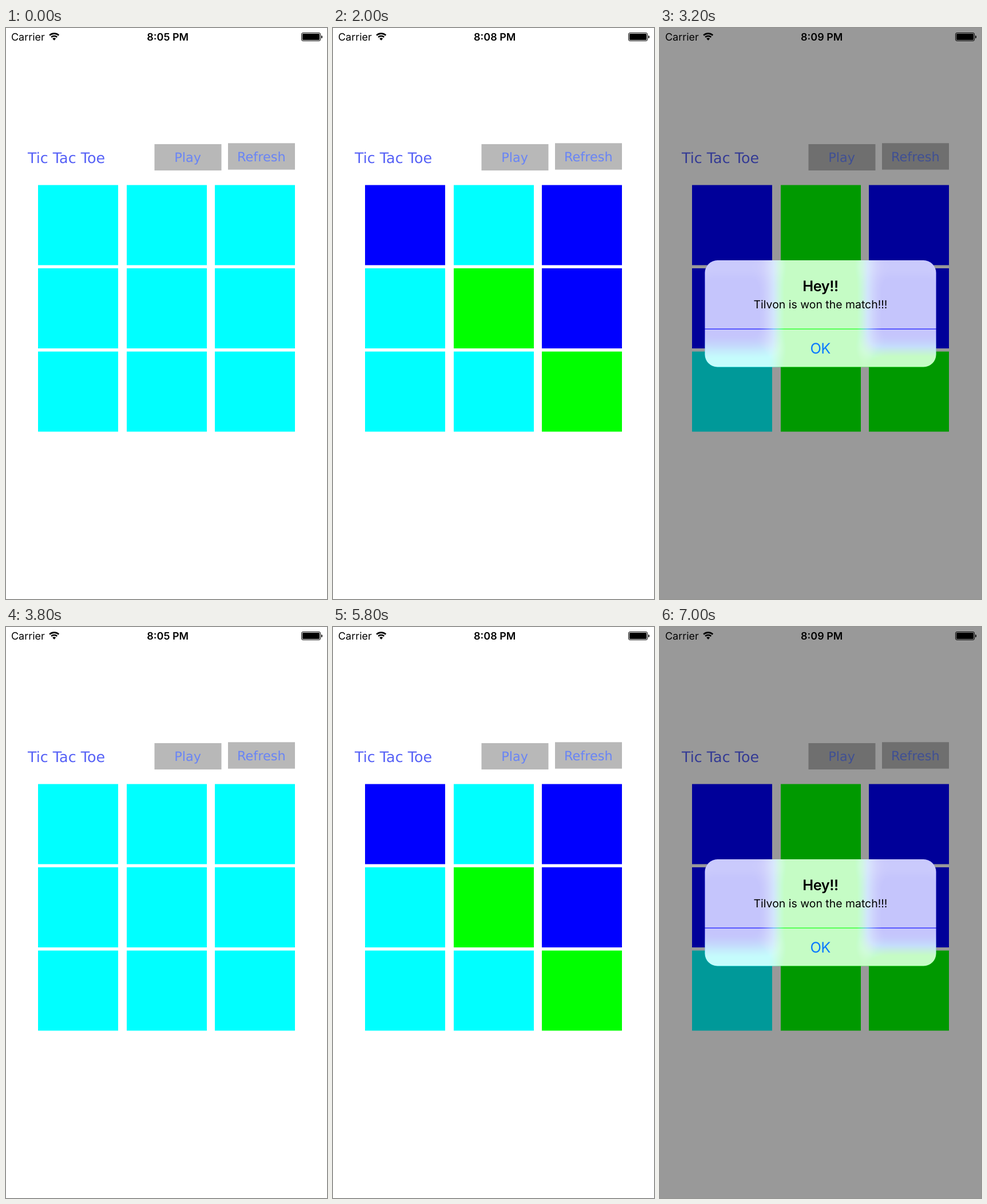
Write an HTML page that moves like this. It is 561 px wide and 998 px high and loops after 7600 ms.

```html
<!DOCTYPE html>
<html lang="en">
<head>
<meta charset="utf-8">
<title>Tic Tac Toe</title>
<style>
  html, body { margin: 0; width: 100%; height: 100%; overflow: hidden; background: #fff; }
  svg { display: block; width: 561px; height: 998px; }
  text { font-family: Inter, sans-serif; text-rendering: geometricPrecision; }
  .verdana { font-family: "DejaVu Sans", sans-serif; }
  .status { font-size: 17.95px; }
  .mid { text-anchor: middle; }
  .bold { font-weight: 600; }
  .button rect { fill: #b8b8b8; }
  .button text { fill: #6884f6; font-size: 22.4px; }
</style>
</head>
<body>
<svg viewBox="0 0 561 998">
  <defs>
    <filter id="frost" filterUnits="userSpaceOnUse" x="0" y="200" width="561" height="600" color-interpolation-filters="sRGB">
      <feGaussianBlur stdDeviation="15"/>
      <feColorMatrix type="saturate" values="1.8"/>
    </filter>
    <clipPath id="panel"><rect x="78.5" y="406" width="404" height="186.5" rx="22"/></clipPath>
  </defs>

  <rect width="561" height="998" fill="#fff"/>

  <text class="status" x="9" y="22">Carrier</text>
  <g fill="none" stroke="#000" stroke-width="2.6">
    <path d="M76.1 12.8A12 12 0 0 1 92.3 12.8M79.1 16A7.6 7.6 0 0 1 89.3 16"/>
    <path d="M84.2 21.8L81.2 18.6A4.3 4.3 0 0 1 87.2 18.6Z" fill="#000" stroke="none"/>
  </g>
  <text id="clock" class="status mid bold" x="282.7" y="22"></text>
  <rect x="516.5" y="8.5" width="33" height="14" rx="2.5" fill="none" stroke="#000"/>
  <rect x="518" y="10" width="30" height="11" rx="1.2"/>
  <path d="M551 13a2 2.6 0 0 1 0 5.2Z"/>

  <text class="verdana" x="38" y="236" font-size="25.4" fill="#5560f6">Tic Tac Toe</text>
  <g class="button">
    <rect x="259.5" y="203" width="117" height="46"/>
    <text class="verdana mid" x="317.7" y="234">Play</text>
    <rect x="388" y="201.3" width="117" height="46.3"/>
    <text class="verdana mid" x="446.3" y="232.5">Refresh</text>
  </g>

  <g id="board"></g>

  <g id="alert">
    <rect width="561" height="998" opacity=".4"/>
    <g clip-path="url(#panel)">
      <g filter="url(#frost)">
        <rect y="200" width="561" height="600" fill="#fff"/>
        <use href="#board"/>
      </g>
      <!-- the gap between the two halves is the divider -->
      <path d="M78 406h405v119.6H78ZM78 526.7h405v66H78Z" fill="rgb(251,251,251)" fill-opacity=".785"/>
      <rect x="78" y="525.6" width="405" height="1.1" fill="#fff" opacity=".15"/>
    </g>
    <text class="mid bold" x="280.5" y="460" font-size="25.4" letter-spacing="-.4">Hey!!</text>
    <text class="mid" x="280.5" y="490" font-size="19.45">Tilvon is won the match!!!</text>
    <text class="mid" x="280.2" y="568.5" font-size="25.4" letter-spacing="-.6" fill="#0a7aff">OK</text>
  </g>
</svg>
<script>
  const STEP = 400, LOOP = 3800;
  const moves = [2, 4, 5, 8, 0, 1, 3, 7];   // cells in order of play, players alternate
  const minutes = "555667889";
  const EMPTY = "#0ff", PLAYERS = ["#00f", "#0f0"];
  const $ = id => document.getElementById(id);

  const cells = Array.from({ length: 9 }, (_, i) => {
    const cell = document.createElementNS("http://www.w3.org/2000/svg", "rect");
    const box = { x: [56, 211, 365][i % 3], y: 274.5 + 145.5 * Math.floor(i / 3), width: 140, height: 140 };
    for (const key in box) cell.setAttribute(key, box[key]);
    return $("board").appendChild(cell);
  });

  let shown = -1;
  function draw(now) {
    const step = Math.min(moves.length, Math.floor(now % LOOP / STEP));
    if (step !== shown) {
      shown = step;
      cells.forEach((cell, i) => {
        const turn = moves.indexOf(i);
        cell.setAttribute("fill", turn >= 0 && turn < step ? PLAYERS[turn % 2] : EMPTY);
      });
      $("clock").textContent = `8:0${step < 2 ? 5 : minutes[step + 1] || 9} PM`;
      $("alert").style.display = step === moves.length ? "" : "none";
    }
    requestAnimationFrame(draw);
  }
  draw(performance.now());
</script>
</body>
</html>
```
